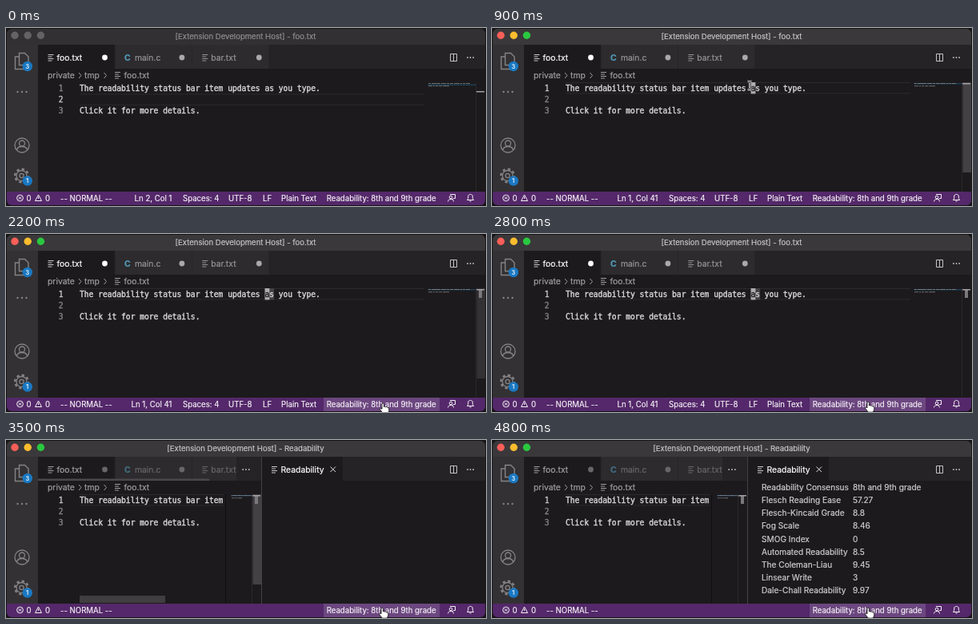
Recreate the animation shown at these times as an HTML page with a canvas. Size 600 by 223 pixels, loop 5 s.

```html
<!DOCTYPE html>
<html>
<head>
<meta charset="utf-8">
<style>
html, body { margin: 0; width: 600px; height: 223px; overflow: hidden; background: #171416; }
canvas { display: block; }
</style>
</head>
<body>
<canvas id="stage" width="600" height="223"></canvas>
<script>
const ctx = document.getElementById('stage').getContext('2d');
const LOOP = 5000, STEP = 100;
const CHAR = 5.79, CODE_X = 92, LINE_H = 14.4, LINE_TOP = 68;
const ENTER = 200, CLICK_TEXT = 800, MARK_WORD = 1100, HOVER = 1700;
const CLICK_STATUS = 3100, SPLIT = 3300, RESULTS = 3700;
const EDITOR = '#1c1a1c', TABBAR = '#252325', TAB = '#2d2b2d', STATUS = '#54286a';
const SANS = 'Inter, sans-serif', MONO = '"DejaVu Sans Mono", monospace';

const lines = ['The readability status bar item updates as you type.', '', 'Click it for more details.'];
const scores = [
  ['Readability Consensus', '8th and 9th grade'],
  ['Flesch Reading Ease', '57.27'],
  ['Flesch-Kincaid Grade', '8.8'],
  ['Fog Scale', '8.46'],
  ['SMOG Index', '0'],
  ['Automated Readability', '8.5'],
  ['The Coleman-Liau', '9.45'],
  ['Linsear Write', '3'],
  ['Dale-Chall Readability', '9.97']
];
// time, x, y
const pointer = [[100, 345, 226], [700, 322, 72], [1200, 322, 72], [1500, 423, 174],
  [1850, 473, 218], [2400, 473, 218], [2600, 472, 216.5], [LOOP, 472, 216.5]];

function rect(x, y, w, h, color) {
  ctx.fillStyle = color;
  ctx.fillRect(x, y, w, h);
}
function disc(x, y, r, color) {
  ctx.fillStyle = color;
  ctx.beginPath();
  ctx.arc(x, y, r, 0, 7);
  ctx.fill();
}
function stroke(d, color, width = 1, x = 0, y = 0) {
  ctx.save();
  ctx.translate(x, y);
  ctx.strokeStyle = color;
  ctx.lineWidth = width;
  ctx.stroke(new Path2D(d));
  ctx.restore();
}
function ring(x, y, r, color, width = 1, dash = []) {
  ctx.strokeStyle = color;
  ctx.lineWidth = width;
  ctx.setLineDash(dash);
  ctx.beginPath();
  ctx.arc(x, y, r, 0, Math.PI * 2);
  ctx.stroke();
  ctx.setLineDash([]);
}
// A hairline outline gives the slightly heavy look of smoothed screen text.
function text(s, x, y, color, size = 10.4, align = 'left', font = SANS, weight = 400) {
  ctx.font = `${weight} ${size}px ${font}`;
  ctx.textAlign = align;
  ctx.fillStyle = ctx.strokeStyle = color;
  ctx.lineWidth = font === MONO ? 0.4 : 0.2;
  ctx.fillText(s, x, y);
  ctx.strokeText(s, x, y);
}
function code(s, x, line, color, align) {
  text(s, x, 78.5 + line * LINE_H, color, 9.62, align, MONO);
}
function clipped(x, y, w, h, draw) {
  ctx.save();
  ctx.beginPath();
  ctx.rect(x, y, w, h);
  ctx.clip();
  draw();
  ctx.restore();
}
function faded(alpha, draw) {
  ctx.globalAlpha = alpha;
  draw();
  ctx.globalAlpha = 1;
}
function dots(x, y, gap, r, color) {
  for (let i = -1; i <= 1; i++) disc(x + i * gap, y, r, color);
}
function listIcon(x, y, color) {
  stroke('M0 .5h7M0 3h5M0 5.5h7M0 8h5', color, 1, x, y);
}
function editorActions(color) {
  stroke('M555.5 32.5h8v9h-8zM559.5 32.5v9', color);
  dots(580.5, 37, 3.6, 0.9, color);
}

function titleBar(focused, split) {
  const title = split ? 'Readability' : 'foo.txt';
  rect(1, 1, 598, 20, focused ? '#3a383a' : '#323032');
  ['#fb5f58', '#fbbd2e', '#2ac840'].forEach((c, i) => disc(11 + 16.2 * i, 9.3, 4.7, focused ? c : '#646264'));
  text(`[Extension Development Host] - ${title}`, 299.5, 14, focused ? '#c8c6c8' : '#929092', 9.55, 'center');
}

function badge(x, y, n) {
  disc(x, y, 6.2, '#1a78c2');
  text(n, x, y + 2.6, '#fff', 7.2, 'center');
}
function activityBar() {
  const gray = '#858385';
  rect(1, 21, 39, 184, '#333133');
  stroke('M16.5 31.5h7l4.5 4.5v10.5h-11.5zM16 36h-4.5v15.5h11v-4.5', gray, 1.4);
  badge(26.8, 48, '3');
  dots(20, 80, 5.5, 1.2, gray);
  ring(20, 147, 9, gray, 1.3);
  ring(20, 144.5, 3.5, gray, 1.3);
  stroke('M13.5 153c1-6 12-6 13 0', gray, 1.3);
  ring(19.5, 185, 8.3, gray, 2.4, [3.3, 3.2]);
  ring(19.5, 185, 6.5, gray, 1.3);
  ring(19.5, 185, 2.6, gray, 1.3);
  badge(26.8, 191.5, '1');
}

function tabs(split, edge) {
  const active = split ? '#a3a1a3' : '#fff', idle = split ? '#686668' : '#969496';
  rect(40, 21, edge - 40, 30, TABBAR);
  clipped(40, 21, split ? 248 : edge - 40, 30, () => {
    ['foo.txt', 'main.c', 'bar.txt'].forEach((name, i) => {
      const x = 40 + 96.4 * i, isC = name.endsWith('.c');
      rect(x, 21, 95.6, 30, i ? TAB : EDITOR);
      if (isC) faded(split ? 0.6 : 1, () => text('C', x + 11.5, 41, '#519aba', 10.4, 'left', SANS, 700));
      else listIcon(x + 12.5, 33, i ? idle : split ? active : '#ccc');
      text(name, x + (isC ? 24.5 : 23.5), 40.5, i ? idle : active);
      disc(x + 83.5, 37, 3.4, split ? idle : i ? '#aaa8aa' : '#fff');
    });
  });
  if (split) dots(300, 37, 3.8, 0.9, '#c5c3c5');
  else editorActions('#c5c3c5');
}

function breadcrumb() {
  const color = '#a09ea0';
  text('private', 52, 62.5, color);
  text('tmp', 98, 62.5, color);
  stroke('M91 56l3 3.5l-3 3.5M122.5 56l3 3.5l-3 3.5', color);
  listIcon(136, 55, color);
  text('foo.txt', 147.5, 62.5, color);
}

function minimap(x, scale, row) {
  rect(x - 1, 69 + row * 1.6, 60 * scale, 1.4, '#1d4059');
  faded(0.6, () => lines.forEach((s, n) => {
    let at = x;
    for (const word of s.split(' ')) {
      rect(at, 69 + n * 1.6, word.length * scale, 1, '#a5a3a5');
      at += (word.length + 1) * scale;
    }
  }));
}

function scrollbars(t, split, edge) {
  const fadeFrom = split ? 3700 : 2000, span = split ? 800 : 500;
  const alpha = t < ENTER ? 0 : Math.min(1, Math.max(0, 1 - (t - fadeFrom) / span));
  faded(alpha, () => {
    rect(edge - 10.5, LINE_TOP, 10.5, 113, '#434143');
    if (!split) return;
    rect(92, 195, 107, 9, '#403e40');
    rect(40, 48.5, 214, 2.5, '#4a484a');
  });
}

function caretVisible(t) {
  return t >= CLICK_TEXT && t < CLICK_STATUS && Math.floor((t - CLICK_TEXT) / 500) % 2 === 0;
}

function editor(t, split, edge) {
  const row = t < CLICK_TEXT ? 1 : 0, right = split ? 272 : 523;
  const top = LINE_TOP + row * LINE_H, caretX = CODE_X + 40 * CHAR;
  rect(40, 51, edge - 40, 154, EDITOR);
  breadcrumb();
  rect(CODE_X, top, right - CODE_X, 1, '#2c2a2c');
  rect(CODE_X, top + LINE_H - 1, right - CODE_X, 1, '#2c2a2c');
  if (t >= MARK_WORD) rect(caretX, LINE_TOP, 2 * CHAR, LINE_H, '#434143');
  clipped(40, 51, right - 40, 154, () => lines.forEach((s, i) => {
    code(i + 1, 71.5, i, i === row ? '#c6c4c6' : '#858385', 'right');
    code(s, CODE_X, i, '#d8d6d8');
  }));
  if (caretVisible(t)) {
    rect(caretX, top, CHAR, LINE_H, '#aeacae');
    code('a', caretX, 0, EDITOR);
  }
  if (split) rect(274, LINE_TOP, 1, 137, '#111011');
  minimap(split ? 282 : 528, split ? 0.5 : 1, row);
  rect(edge - 12, LINE_TOP, 1, 137, '#2b292b');
  scrollbars(t, split, edge);
  if (t >= MARK_WORD) rect(edge - 8, 69, 4, 11, '#7a787a');
  rect(edge - 11, row ? 79 : 69, 10, 1.5, '#a3a1a3');
}

function resultsPane(t) {
  rect(319, 21, 1, 184, '#434143');
  rect(320, 21, 279, 30, TABBAR);
  rect(320, 21, 101, 30, EDITOR);
  rect(320, 51, 279, 154, EDITOR);
  listIcon(332, 33, '#ccc');
  text('Readability', 343.5, 40.5, '#fff');
  stroke('M405.5 33.5l6.5 6.5m0-6.5l-6.5 6.5', '#e0dee0');
  editorActions('#c5c3c5');
  if (t < RESULTS) return;
  scores.forEach(([name, value], i) => {
    const y = 63.3 + i * 16.05;
    text(name, 337, y, '#cfcdcf', 10.15);
    text(value, 451, y, '#cfcdcf', 10.15);
  });
}

function statusBar(t, split) {
  const white = '#f4f0f5', label = (s, x, align) => text(s, x, 216.5, white, 9.63, align);
  rect(1, 205, 598, 17, STATUS);
  if (t >= HOVER) rect(397, 205, 145, 17, '#6c4780');
  ring(17.5, 213, 3.9, white);
  stroke('M15.8 211.3l3.4 3.4m0-3.4l-3.4 3.4M40.5 209l4 7.5h-8zM40.5 211.5v2.5', white);
  label('0', 25.5);
  label('0', 49);
  label('-- NORMAL --', 68);
  if (!split) {
    label(t < CLICK_TEXT ? 'Ln 2, Col 1' : 'Ln 1, Col 41', 207.5, 'right');
    label('Spaces: 4', 221);
    label('UTF-8', 278);
    label('LF', 321);
    label('Plain Text', 344);
  }
  label('Readability: 8th and 9th grade', 400.7);
  ring(556, 212, 1.8, white);
  stroke('M552.5 217.5c0-4 7-4 7 0M555 208.5h6.5v5h-2l-1.5 1.5', white);
  stroke('M576.5 215.5h8l-1.2-2v-2.5c0-3.5-5.6-3.5-5.6 0v2.5zM579.5 217h2', white);
}

function drawPointer(t) {
  if (t < pointer[0][0]) return;
  const i = pointer.findIndex(p => p[0] > t);
  const [t0, x0, y0] = pointer[i - 1], [t1, x1, y1] = pointer[i];
  const u = (t - t0) / (t1 - t0), k = u * u * (3 - 2 * u);
  const x = x0 + (x1 - x0) * k, y = y0 + (y1 - y0) * k;
  if (y < 205) {
    const beam = 'M-2.5-5.5q2.5 0 2.5 2v7q0 2-2.5 2M2.5-5.5q-2.5 0-2.5 2M0 3.5q0 2 2.5 2';
    stroke(beam, '#f0eef0', 2.2, x, y);
    stroke(beam, '#111', 0.8, x, y);
    return;
  }
  const hand = 'M-2.5-4.5q1.3-1.3 2 .3v3q1-.8 1.8.2q1-.6 1.7.4q1.8-.4 1.8 1.4v2.2l-1.3 2.5h-5l-3.3-4.3q-.5-1.7 2.3-.2z';
  ctx.save();
  ctx.translate(x, y);
  ctx.scale(1.2, 1.2);
  ctx.fillStyle = '#fff';
  ctx.fill(new Path2D(hand));
  stroke(hand, '#111', 0.7);
  ctx.restore();
}

function draw(t) {
  const split = t >= SPLIT, edge = split ? 319 : 599;
  rect(0, 0, 600, 223, '#171416');
  ctx.save();
  ctx.beginPath();
  ctx.roundRect(1, 1, 598, 221, 6);
  ctx.clip();
  titleBar(t >= CLICK_TEXT, split);
  activityBar();
  tabs(split, edge);
  editor(t, split, edge);
  if (split) resultsPane(t);
  statusBar(t, split);
  ctx.restore();
  drawPointer(t);
}

const start = performance.now();
function tick() {
  const t = (performance.now() - start) % LOOP;
  draw(Math.floor(t / STEP) * STEP);
  requestAnimationFrame(tick);
}
tick();
</script>
</body>
</html>
```
